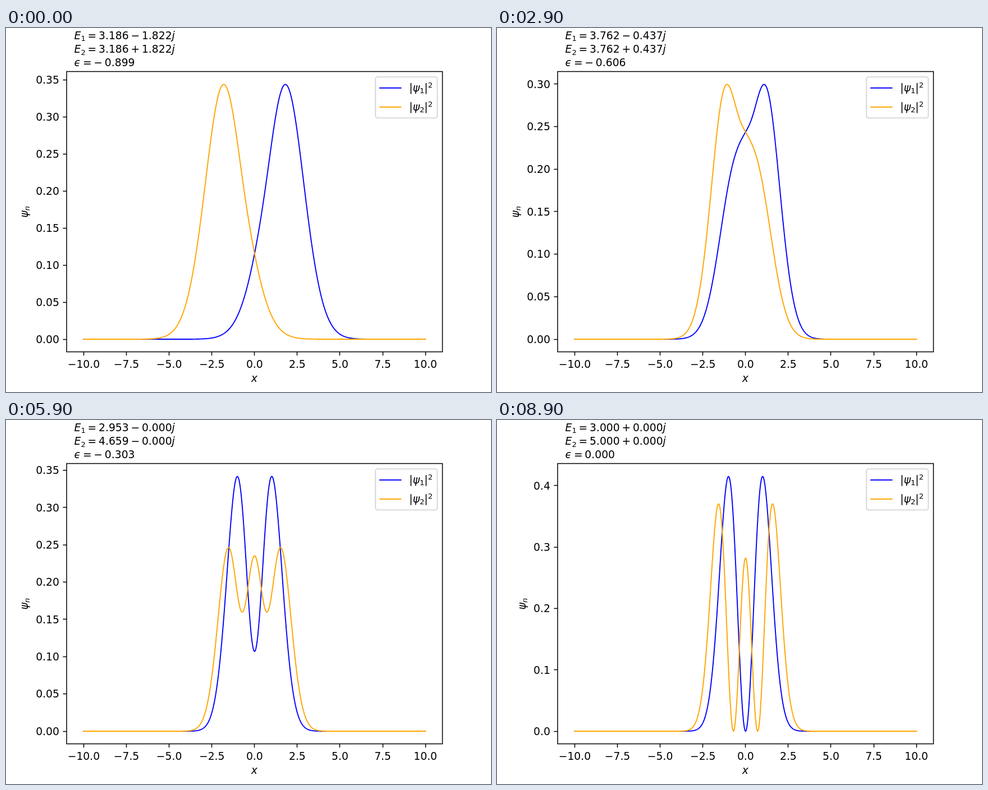
Write an HTML page that moves like this. It is 864 px wide and 648 px high and loops after 9 s.

```html
<!DOCTYPE html>
<html lang="en">
<head>
<meta charset="utf-8">
<title>Complex oscillator states</title>
<style>
  html, body { margin: 0; width: 100%; height: 100%; overflow: hidden; background: #fff; }
  svg { display: block; width: 864px; height: 648px; }
  text { font: 18.75px "DejaVu Sans", sans-serif; fill: #000; }
  .mid { text-anchor: middle; }
  .end { text-anchor: end; }
  .it { font-style: italic; }
  .small { font-size: 13.125px; }
  .axis { fill: none; stroke: #000; stroke-width: 1.5; }
  .curve { fill: none; stroke-width: 1.9; stroke-linejoin: round; stroke-linecap: square; }
</style>
</head>
<body>
<svg viewBox="0 0 864 648"><g id="plot"></g><g id="fixed"></g></svg>
<script>
// States 1 and 2 of H = p^2 + x^2 (ix)^eps, with eps rising to 0.
const FRAMES = 90, FRAME_MS = 100;
const X = 10, STEPS = 400, H = X / STEPS;
const COLORS = ['#0000ff', '#ffa500'];
const BOX = { left: 108, top: 77.5, right: 777.5, bottom: 576.5 };
const px = x => 442.8 + x * 30.436;

// Potential on half steps from x = X down to 0.
function potential(eps) {
  const angle = Math.PI * eps / 2;
  return Array.from({ length: 2 * STEPS + 1 }, (_, j) => {
    const r = ((2 * STEPS - j) * H / 2) ** (2 + eps);
    return [r * Math.cos(angle), r * Math.sin(angle)];
  });
}

// Solution that decays at large x, integrated inwards (Nystrom, 4th order).
function decay(V, er, ei) {
  let yr = 0, yi = 0, vr = 1, vi = 0;
  const density = [0];
  const accel = (j, r, i) => {
    const qr = V[j][0] - er, qi = V[j][1] - ei;
    return [qr * r - qi * i, qr * i + qi * r];
  };
  for (let n = 0; n < 2 * STEPS; n += 2) {
    const a = accel(n, yr, yi);
    const b = accel(n + 1, yr + H / 2 * vr + H * H / 8 * a[0], yi + H / 2 * vi + H * H / 8 * a[1]);
    const c = accel(n + 2, yr + H * vr + H * H / 2 * b[0], yi + H * vi + H * H / 2 * b[1]);
    yr += H * vr + H * H / 6 * (a[0] + 2 * b[0]);
    yi += H * vi + H * H / 6 * (a[1] + 2 * b[1]);
    vr += H / 6 * (a[0] + 4 * b[0] + c[0]);
    vi += H / 6 * (a[1] + 4 * b[1] + c[1]);
    density.push(yr * yr + yi * yi);
  }
  return { yr, yi, vr, vi, density };
}

// Wronskian at x = 0 of the two decaying sides; zero at an eigenvalue.
function wronskian(V, er, ei) {
  const a = decay(V, er, ei), b = decay(V, er, -ei);
  return [
    a.vr * b.yr + a.vi * b.yi + b.vr * a.yr + b.vi * a.yi,
    a.vi * b.yr - a.vr * b.yi + b.vr * a.yi - b.vi * a.yr
  ];
}

// Both energies are mean -/+ sqrt(disc); this form stays smooth where they merge.
function mismatch(V, mean, disc) {
  const s = Math.sqrt(Math.abs(disc));
  if (disc < 0) {
    const [re, im] = wronskian(V, mean, s);
    return [re, im / s];
  }
  const p = wronskian(V, mean + s, 0)[0], q = wronskian(V, mean - s, 0)[0];
  return [(p + q) / 2, (p - q) / (2 * s)];
}

function refine(V, mean, disc) {
  const d = 1e-5;
  for (let k = 0; k < 5; k++) {
    const f = mismatch(V, mean, disc);
    const fm = mismatch(V, mean + d, disc), fd = mismatch(V, mean, disc + d);
    const a = (fm[0] - f[0]) / d, b = (fd[0] - f[0]) / d;
    const c = (fm[1] - f[1]) / d, e = (fd[1] - f[1]) / d;
    const det = a * e - b * c;
    mean -= (e * f[0] - b * f[1]) / det;
    disc -= (a * f[1] - c * f[0]) / det;
  }
  return [mean, disc];
}

function probability(V, er, ei) {
  const right = decay(V, er, ei), left = decay(V, er, -ei);
  const size = p => p.yr ** 2 + p.yi ** 2 + p.vr ** 2 + p.vi ** 2;
  const k = size(right) / size(left);
  const values = [...left.density.map(v => v * k), ...right.density.reverse().slice(1)];
  const area = values.reduce((sum, v) => sum + v, 0) * H;
  return values.map(v => v / area);
}

const solved = [];
function solve(i) {
  while (solved.length <= i) {
    const n = solved.length, eps = (n - FRAMES + 1) / 99;
    const V = potential(eps);
    const last = solved[n - 1], prior = solved[n - 2] || last;
    const guess = last ? [2 * last.mean - prior.mean, 2 * last.disc - prior.disc] : [3.192, -3.262];
    const [mean, disc] = refine(V, ...guess);
    const s = Math.sqrt(Math.abs(disc));
    const energies = disc < 0 ? [[mean, -s], [mean, s]] : [[mean - s, 0], [mean + s, 0]];
    const curves = energies.map(E => probability(V, ...E));
    solved.push({ eps, mean, disc, energies, curves });
  }
  return solved[i];
}

const span = (s, attrs = '') => `<tspan ${attrs}>${s}</tspan>`;
const text = (x, y, s, attrs = '') => `<text x="${x}" y="${y}" ${attrs}>${s}</text>`;
const italic = s => span(s, 'class="it"');
const sub = (s, cls = '') => span(s, `dy="3.1" class="small ${cls}"`);
const gap = (s, dy = 0) => span(s, `dx="3.75" dy="${dy}"`);
const signed = v => (v < 0 ? '\u2212' : '') + Math.abs(v).toFixed(1);

function energyLine(k, [re, im], minus) {
  return italic('E') + sub(k) + gap('=', -3.1) + gap(re.toFixed(3)) +
    gap(minus ? '\u2212' : '+') + gap(Math.abs(im).toFixed(3)) + italic('j');
}

function titles({ eps, disc, energies }) {
  const real = disc > 0;
  const minus = [real ? eps < 0 : true, real && eps < -0.2];
  const value = (eps < 0 ? gap('\u2212') : '') + gap(Math.abs(eps).toFixed(3));
  return text(121.6, 19.8, energyLine(1, energies[0], minus[0])) +
    text(121.6, 44.4, energyLine(2, energies[1], minus[1])) +
    text(121.6, 68, italic('\u03f5') + gap('=') + value);
}

function draw(state) {
  const max = Math.max(...state.curves.flat());
  const py = v => 576.72 - (v / max + 0.05) / 1.1 * 498.96;
  const step = [0.025, 0.05, 0.1].find(s => s >= 1.1 * max / 9);
  const digits = { 0.025: 3, 0.05: 2, 0.1: 1 }[step];
  let out = titles(state);
  state.curves.forEach((values, k) => {
    const points = values.map((v, j) => px(j * H - X).toFixed(2) + ',' + py(v).toFixed(2));
    out += `<polyline class="curve" stroke="${COLORS[k]}" points="${points.join(' ')}"/>`;
  });
  for (let j = 0; j * step <= 1.05 * max; j++) {
    const y = py(j * step);
    out += `<path class="axis" d="M${BOX.left} ${Math.round(y - 0.5) + 0.5}h-6.6"/>` +
      text(94.9, y + 6.8, (j * step).toFixed(digits), 'class="end"');
  }
  const x = 39.3 + (2 - digits) * 11.9;
  out += text(0, 0, italic('\u03c8') + sub('n', 'it'),
    `class="mid" transform="translate(${x} 327.2) rotate(-90)"`);
  document.getElementById('plot').innerHTML = out;
}

function drawFixed() {
  const { left, top, right, bottom } = BOX;
  let out = `<rect class="axis" x="${left}" y="${top}" width="${right - left}" height="${bottom - top}"/>`;
  for (let v = -10; v <= 10; v += 2.5) {
    out += `<path class="axis" d="M${Math.round(px(v) - 0.5) + 0.5} ${bottom}v6.6"/>` +
      text(px(v), 604.7, signed(v), 'class="mid"');
  }
  out += text(442.3, 630.3, 'x', 'class="mid it"');
  out += '<rect x="658.2" y="87.1" width="110.2" height="73" rx="3.75" fill="#fff" fill-opacity=".8" stroke="#ccc" stroke-opacity=".8" stroke-width="1.9"/>';
  COLORS.forEach((color, k) => {
    const y = 106.8 + k * 34;
    out += `<path class="curve" stroke="${color}" d="M666 ${y}h37.5"/>` +
      text(718.3, y + 6.4, '|' + italic('\u03c8') + sub(k + 1) + span('|', 'dy="-3.1"') +
        span('2', 'dy="-7.2" class="small"'));
  });
  document.getElementById('fixed').innerHTML = out;
}

let shown = -1;
function tick() {
  const i = Math.floor(performance.now() / FRAME_MS) % FRAMES;
  if (i !== shown) draw(solve(shown = i));
  requestAnimationFrame(tick);
}
drawFixed();
tick();
</script>
</body>
</html>
```
